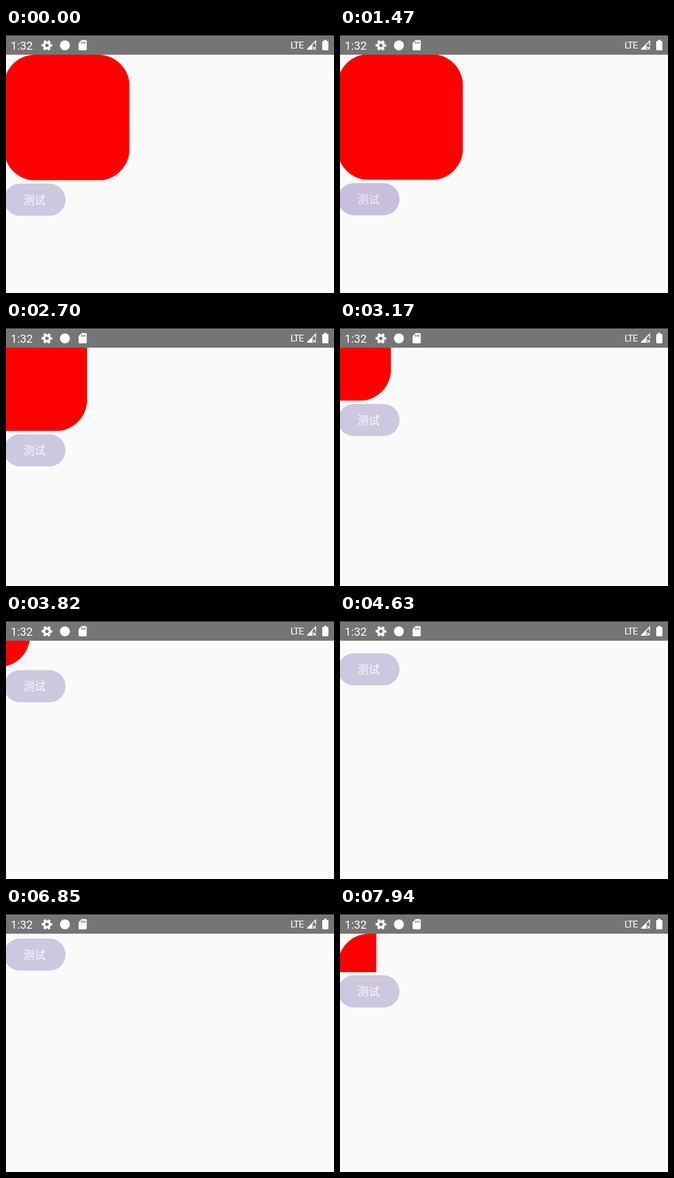
Animation, 529 px wide and 427 px high, one loop 7990 ms. Source, as an HTML page:

```html
<!DOCTYPE html>
<html lang="zh-CN">
<head>
<meta charset="utf-8">
<style>
html, body { margin: 0; width: 100%; height: 100%; overflow: hidden; background: #fafafa; }
svg { display: block; }
text { fill: #fff; font-family: Roboto, sans-serif; }
#label { font: 18px "Noto Sans CJK SC", "Noto Sans CJK", sans-serif; text-anchor: middle; fill: #fafafa; }
</style>
</head>
<body>
<svg width="529" height="427" viewBox="0 0 529 427">
  <rect width="529" height="427" fill="#fafafa"/>

  <svg id="window" x="-3.4" y="43">
    <rect id="box" width="202.6" height="202.6" rx="50.6" fill="#f00"/>
  </svg>

  <g id="button">
    <rect x="-3.4" width="99.4" height="51.8" rx="25.9" fill="#cdc7e0"/>
    <text id="label" x="46" y="32.8">测试</text>
    <rect id="ripple" x="-3.4" width="99.4" height="51.8" rx="25.9" fill="#503080"/>
  </g>

  <rect width="529" height="12"/>
  <rect y="12" width="529" height="31" fill="#757575"/>
  <text x="7.5" y="35" font-size="18.5">1:32</text>
  <text x="458.8" y="33" font-size="15.5" letter-spacing="-1.2">LTE</text>

  <g fill="none" stroke="#fff">
    <circle cx="66" cy="28" r="4.6" stroke-width="3.6"/>
    <circle cx="66" cy="28" r="7.3" stroke-width="2.6" stroke-dasharray="4.2 3.445" stroke-dashoffset="2.1"/>
  </g>
  <circle cx="95" cy="28" r="8" fill="#fff"/>
  <path d="M122 19.5h6.5q1.7 0 1.7 1.7v13q0 1.7-1.7 1.7h-9.8q-1.7 0-1.7-1.7v-9.7z" fill="#fff"/>
  <path d="M121.8 22v3.4m2.8-3.4v3.4m2.8-3.4v3.4" stroke="#757575" stroke-width="1.4"/>
  <path d="M485 35l9.3-9.3V35z" fill="#fff"/>
  <path d="M486 34.3L499.4 21v7.2M495.3 30.2l4.6 4.6m0-4.6l-4.6 4.6" fill="none" stroke="#fff" stroke-width="1.5"/>
  <path d="M513 19h4v2h1.6q1.4 0 1.4 1.4v12.2q0 1.4-1.4 1.4h-7.2q-1.4 0-1.4-1.4V22.4q0-1.4 1.4-1.4H513z" fill="#fff"/>
</svg>
<script>
const LOOP = 7990, SIZE = 202.6, TOP = 43, GAP = 5.2;
const HIDE = { start: 1256, length: 5000 }, SHOW = { start: 6472, length: 5300 };
const el = id => document.getElementById(id);
const set = (id, attrs) => {
  for (const name in attrs) el(id).setAttribute(name, attrs[name]);
};
const clamp = v => Math.min(1, Math.max(0, v));

// cubic-bezier(0.4, 0, 0.2, 1)
function ease(x) {
  let low = 0, high = 1;
  for (let i = 0; i < 24; i++) {
    const s = (low + high) / 2, r = 1 - s;
    if (1.2 * r * r * s + 0.6 * r * s * s + s ** 3 < x) low = s;
    else high = s;
  }
  return low * low * (3 - 2 * low);
}

const progress = (t, { start, length }) => {
  const x = clamp((t - start) / length);
  return x === 0 || x === 1 ? x : ease(x);
};

const pulse = (t, start) => clamp((t - start) / 50) * clamp((start + 330 - t) / 130);

function draw(t) {
  const showing = t >= SHOW.start;
  const size = SIZE * (showing ? progress(t, SHOW) : 1 - progress(t, HIDE));
  const shift = showing ? 0 : size - SIZE;
  set('window', { width: size, height: size });
  set('box', { x: shift, y: shift });
  set('button', { transform: `translate(0 ${TOP + size + GAP})` });
  set('ripple', { opacity: 0.05 * Math.max(pulse(t, 1280), pulse(t, 6500)) });
}

const begin = performance.now();
function tick() {
  draw((performance.now() - begin) % LOOP);
  requestAnimationFrame(tick);
}
tick();
</script>
</body>
</html>
```
